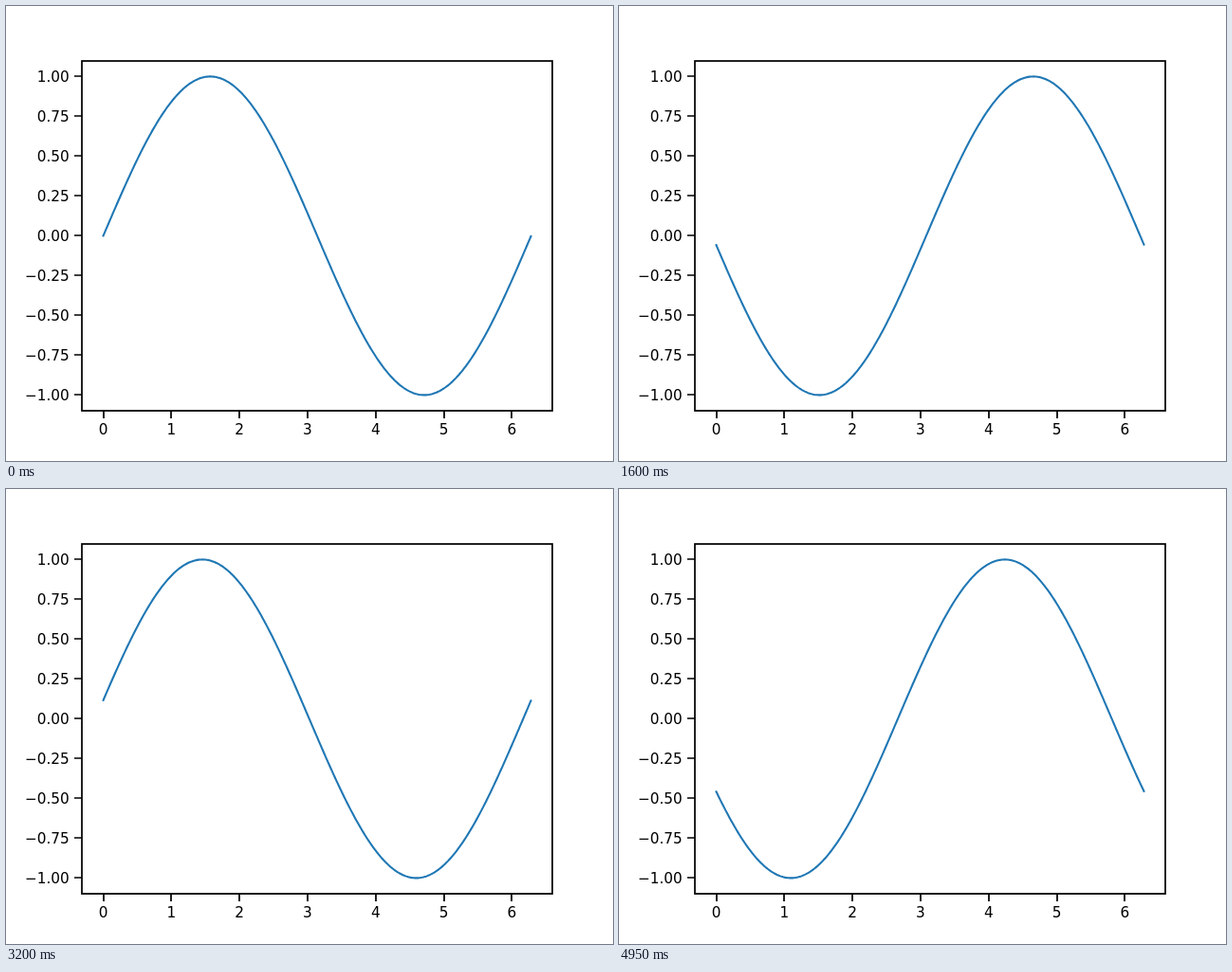
An HTML page that plays this animation: 640x480 px, repeating every 5 s.

```html
<!DOCTYPE html>
<html lang="en">
<head>
<meta charset="utf-8">
<title>Travelling sine wave</title>
<style>
  html, body { margin: 0; width: 100%; height: 100%; overflow: hidden; background: #fff; }
  svg { display: block; }
  text { font: 15.28px "DejaVu Sans", sans-serif; fill: #000; }
  #axes, #ticks { fill: none; stroke: #000; stroke-width: 1.74; }
  #wave { fill: none; stroke: #1f77b4; stroke-width: 2.08; stroke-linecap: square; stroke-linejoin: round; }
  .x { text-anchor: middle; }
  .y { text-anchor: end; }
</style>
</head>
<body>
<svg width="640" height="480" viewBox="0 0 640 480">
  <path id="ticks"/>
  <g id="labels"></g>
  <path id="wave"/>
  <rect id="axes" x="80" y="58" width="496" height="369"/>
</svg>
<script>
  const STEP_MS = 50, STEPS = 100, PHASE_STEP = 0.1;
  const X_MAX = 6.28, SAMPLES = 314;
  const $ = id => document.getElementById(id);
  const px = x => 102.545 + x * 450.909 / X_MAX;
  const py = y => 242.4 - y * 168;

  function addLabel(cls, x, y, text) {
    const el = document.createElementNS("http://www.w3.org/2000/svg", "text");
    el.setAttribute("class", cls);
    el.setAttribute("x", x);
    el.setAttribute("y", y);
    el.textContent = text;
    $("labels").append(el);
  }

  let ticks = "";
  for (let x = 0; x <= 6; x++) {
    ticks += `M${Math.round(px(x))} 427v8`;
    addLabel("x", px(x), 452, x);
  }
  for (let y = -1; y <= 1; y += 0.25) {
    const row = Math.round(py(y));
    ticks += `M80 ${row}h-8`;
    addLabel("y", 66.8, row + 6, y.toFixed(2).replace("-", "\u2212"));
  }
  $("ticks").setAttribute("d", ticks);

  function wavePath(phase) {
    const points = [];
    for (let i = 0; i <= SAMPLES; i++) {
      const x = X_MAX * i / SAMPLES;
      points.push(px(x).toFixed(2) + " " + py(Math.sin(x + phase)).toFixed(2));
    }
    return "M" + points.join("L");
  }

  let shown = -1;
  function draw() {
    const step = Math.floor(performance.now() / STEP_MS) % STEPS;
    if (step !== shown) {
      $("wave").setAttribute("d", wavePath(step * PHASE_STEP));
      shown = step;
    }
    requestAnimationFrame(draw);
  }
  draw();
</script>
</body>
</html>
```
